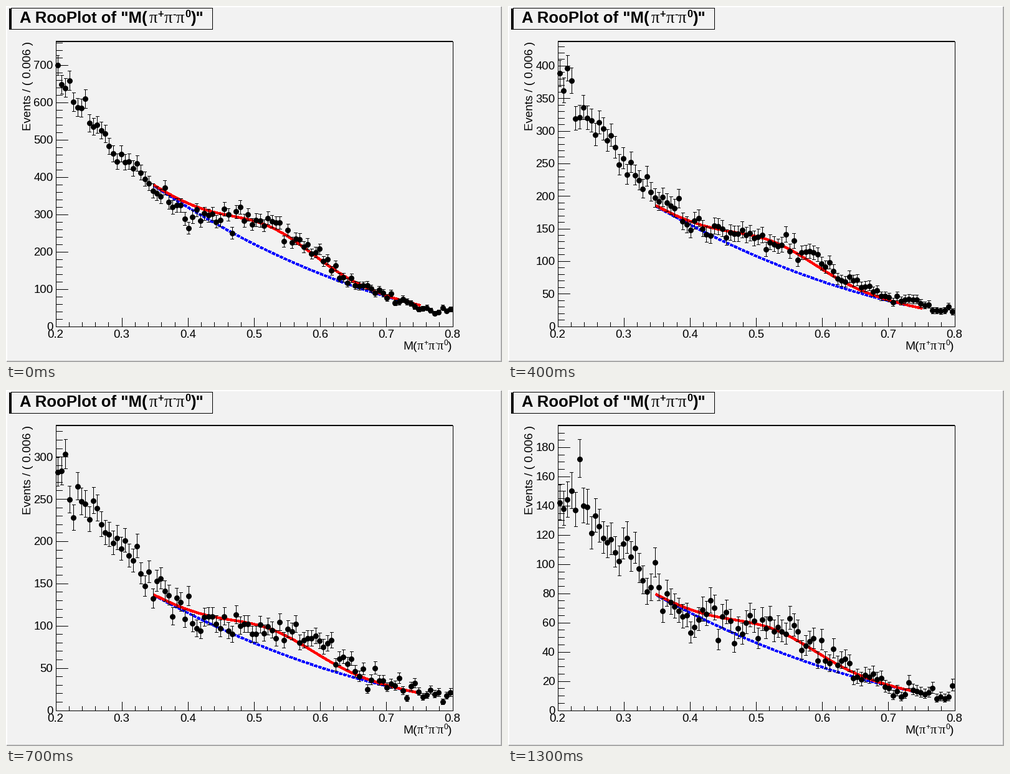
These frames come from a looping animation (796x572 px, 1.6 s). A matplotlib script:

```python
import numpy as np
import matplotlib.pyplot as plt
from matplotlib.animation import FuncAnimation
from matplotlib.collections import LineCollection
from matplotlib.patches import Rectangle

W, H, DPI = 796, 572, 100
LEFT, RIGHT, TOP, BASE = 79.5, 716.5, 57, 514.5
BG = "#f2f2f2"
PT = 72 / DPI
SANS, SERIF = "Liberation Sans", "Liberation Serif"

MASS = 0.203 + 0.006 * np.arange(100)
KNOTS = np.linspace(0.2, 0.8, 7)

# fit height, highest bin, its count, major step, data-to-fit ratio at KNOTS
PANELS = [
    (375, 0, 700, 100, [1.22, 1.04, 0.91, 1.01, 1.09, 0.95, 0.88]),
    (262, 0, 533, 100, [1.33, 1.12, 0.93, 0.94, 1.17, 1.13, 1.26]),
    (183.5, 2, 396, 50, [1.41, 1.18, 0.98, 0.97, 1.13, 1.15, 1.42]),
    (135.4, 2, 303, 50, [1.36, 1.26, 0.98, 0.93, 1.22, 1.07, 1.33]),
    (100.9, 2, 227, 50, [1.38, 1.26, 0.93, 0.95, 1.17, 1.0, 1.0]),
    (78.6, 5, 172, 20, [1.24, 1.24, 0.96, 0.95, 1.15, 0.95, 1.2]),
]

fig = plt.figure(figsize=(W / DPI, H / DPI), dpi=DPI, facecolor=BG)
ax = fig.add_axes([0, 0, 1, 1])
ax.set(xlim=(0, W), ylim=(H, 0))
ax.axis("off")


def px(m):
    return LEFT + (m - 0.2) / 0.6 * (RIGHT - LEFT)


def background(m):
    t = (m - 0.35) / 0.4
    return 1 - 1.25 * t + 0.4 * t**2


def model(m):
    return background(m) + 0.18 * np.exp(-0.5 * ((m - 0.528) / 0.067) ** 2)


def box(x, y, w, h, color, edge="none"):
    ax.add_patch(Rectangle((x, y), w, h, fc=color, ec=edge, lw=PT,
                           antialiased=False))


def text(x, y, s, size=18.6, font=SANS, **kw):
    return ax.text(x, y, s, fontsize=size * PT, family=font,
                   va="baseline", **kw)


def segments(segs, width=1):
    return ax.add_collection(LineCollection(
        segs, colors="black", linewidths=width * PT, antialiaseds=False,
        zorder=4))


def pions(x, y, size, weight="normal"):
    """Write the three-pion symbol and return the x where it ends."""
    for sign, adv in (("+", 0.584), ("-", 0.333), ("0", 0.556)):
        text(x, y, "π", size * 1.04, SERIF)
        x += 0.549 * size
        text(x, y - 0.36 * size, sign, size * 0.63, weight=weight)
        x += adv * 0.63 * size
    return x


def draw_canvas():
    box(0, 0, W, 2, "white")
    box(0, 0, 2, H, "white")
    box(W - 2, 1, 2, H, "#a9a9a9")
    box(1, H - 2, W, 2, "#a9a9a9")

    box(5, 4, 323, 34, "black")
    box(7.5, 2.5, 323, 34, BG, "black")
    size = 25.8
    text(22, 27, 'A RooPlot of "M(', size, weight="bold")
    end = pions(229.5, 27, size, "bold")
    text(end, 27, ')"', size, weight="bold")

    segments([[(LEFT, TOP), (LEFT, BASE)], [(LEFT, BASE), (RIGHT, BASE)],
              [(RIGHT, TOP), (RIGHT, BASE)]])
    segments([[(LEFT, TOP), (RIGHT, TOP)]], 2)
    ticks = []
    for i in range(31):
        x = px(0.2 + 0.02 * i)
        ticks.append([(x, BASE), (x, BASE - (7 if i % 5 else 14))])
        if i % 5 == 0:
            text(x, 533, f"{0.2 + 0.02 * i:.1f}", ha="center")
    segments(ticks)

    size = 19.2
    text(637.5, 551.5, "M(", size)
    end = pions(637.5 + 1.166 * size, 551.5, size)
    text(end, 551.5, ")", size)
    text(40, 57, "Events / ( 0.006 )", 18.8, rotation=90, ha="right",
         rotation_mode="anchor")


def make_counts(seed, height, peak_bin, peak, ratio):
    rng = np.random.default_rng(seed)
    mean = height * model(MASS) * np.interp(MASS, KNOTS, ratio)
    n = np.rint(mean + 0.9 * np.sqrt(mean) * rng.normal(size=MASS.size))
    n = np.clip(n, 6, 0.98 * peak)
    n[peak_bin] = peak
    return n


def make_panel(seed, height, peak_bin, peak, major, ratio):
    top = 1.05 * (peak + 0.5 + np.sqrt(peak + 0.25))
    minor = 5 if major == 20 else major // 5

    def py(v):
        return BASE - v / top * (BASE - TOP)

    arts, ticks = [], []
    for v in range(0, int(top) + 1, minor):
        whole = v % major == 0
        ticks.append([(LEFT, py(v)), (LEFT + (19 if whole else 10), py(v))])
        if whole:
            arts.append(text(75.5, py(v) + 6.5, str(v), ha="right"))
    arts.append(segments(ticks))

    m = np.linspace(0.35, 0.75, 200)
    arts += ax.plot(px(m), py(height * background(m)), color="blue",
                    lw=3 * PT, dashes=(1.6, 0.7), dash_capstyle="butt",
                    antialiased=False, zorder=2)
    arts += ax.plot(px(m), py(height * model(m)), color="red",
                    lw=3.2 * PT, antialiased=False, zorder=3)

    n = make_counts(seed, height, peak_bin, peak, ratio)
    x, err = px(MASS), np.sqrt(n + 0.25)
    bars = []
    for a, lo, hi in zip(x, py(n + 0.5 - err), py(n + 0.5 + err)):
        bars.append([(a, lo), (a, hi)])
        bars += [[(a - 2.5, y), (a + 2.5, y)] for y in (lo, hi)]
    arts.append(segments(bars))
    arts += ax.plot(x, py(n), "o", color="black", ms=9 * PT, mew=0,
                    antialiased=False, zorder=5)
    return arts


draw_canvas()
panels = [make_panel(40 + i, *p) for i, p in enumerate(PANELS)]


def update(k):
    shown = 0 if k == 0 else 1 + (k - 1) // 3
    for i, arts in enumerate(panels):
        for art in arts:
            art.set_visible(i == shown)
    return []


anim = FuncAnimation(fig, update, frames=16, interval=100, repeat=True,
                     repeat_delay=0, init_func=lambda: update(0))
plt.show()
```
